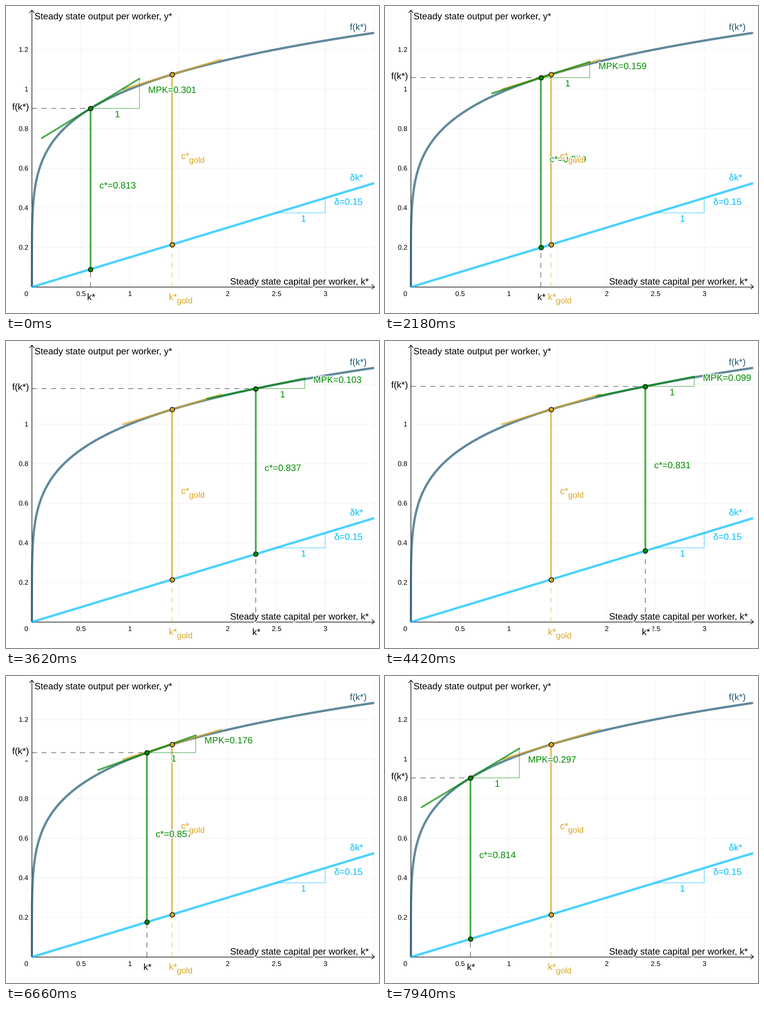
A matplotlib script for the animation above (8 s loop, 813 px wide and 669 px high).

```python
import numpy as np
import matplotlib.pyplot as plt
from matplotlib.animation import FuncAnimation
from matplotlib.patches import PathPatch, Rectangle
from matplotlib.path import Path
from matplotlib.patheffects import withStroke
from matplotlib.textpath import TextPath

W, H, DPI = 813, 669, 64
PX = 72 / DPI                      # points per pixel
X0, Y0, SX, SY = 56.45, 612.4, 213.1, 431.1
RIGHT, TOP = 803, 9
ALPHA, DELTA = 0.2, 0.15
K_MIN, K_MAX, HALF = 0.6, 2.4, 40

NAVY, SKY, GOLD, GREEN = "#1f5872", "#00bfff", "#daa520", "#008c00"

# Timing: the slider advances every 80 ms after a pause, skipping some ticks
TICK, LOOP, PAUSE, STEP = 20, 8000, 500, 80
HOLDS = np.array([1, 7, 11, 19, 25, 30, 36, 41, 48, 52, 58, 64, 70, 76, 82, 88])

plt.rcParams["font.family"] = "Liberation Sans"
fig = plt.figure(figsize=(W / DPI, H / DPI), dpi=DPI, facecolor="white")
ax = fig.add_axes([0, 0, 1, 1])
ax.set_xlim(0, W)
ax.set_ylim(H, 0)
ax.axis("off")


def px(k):
    return X0 + SX * k


def py(y):
    return Y0 - SY * y


def f(k):
    return k ** ALPHA


def mpk(k):
    return ALPHA * k ** (ALPHA - 1)


def line(xs, ys, color, width, z, alpha=0.7, snap=False, **kw):
    kw.setdefault("solid_capstyle", "butt")
    return ax.plot(xs, ys, color=color, lw=width * PX, alpha=alpha,
                   zorder=z, snap=snap, **kw)[0]


def dashed(color):
    dash = line([], [], color, 1.2, 3, dash_capstyle="butt")
    dash.set_dashes((11 / 1.2, 10 / 1.2))
    return dash


def dot(color):
    return ax.plot([], [], "o", ms=10 * PX, mfc=color, mec="black",
                   mew=1.4 * PX, zorder=7, snap=False)[0]


def text_path(s, x, y, size, anchor=0.0):
    tp = TextPath((0, 0), s, size=size)
    v = tp.vertices * [1, -1]
    if anchor:
        ends = v[:, 0]
        x -= anchor * ends.max() + (1 - anchor) * ends.min()
    return Path(v + [x, y], tp.codes)


def label(s, x, y, color="black", size=20, z=10, anchor=0.0, halo=True):
    patch = PathPatch(text_path(s, x, y, size, anchor), fc=color, ec="none",
                      lw=0, zorder=z, joinstyle="round")
    if halo:
        patch.set_path_effects([withStroke(linewidth=4 * PX, foreground="white")])
    return ax.add_patch(patch)


def box(w, h, z):
    return ax.add_patch(Rectangle((0, 0), w, h, fc="white", ec="none", zorder=z))


def draw_grid():
    for k in np.arange(0.5, 3.6, 0.5):
        line([px(k)] * 2, [TOP, Y0], "#efefef", 1, 0, 1)
        if k not in (1.5, 3.5):
            label(f"{k:g}", px(k) + 0.3, 632, size=15, z=8, anchor=0.5, halo=False)
    for y in np.arange(1, 7) / 5:
        line([X0, RIGHT], [py(y)] * 2, "#efefef", 1, 0, 1)
        label(f"{y:g}", 48, py(y) + 4.9, size=15, z=8, anchor=1.0, halo=False)
    label("0", 44, 632, size=15, z=8, anchor=0.5, halo=False)


def draw_axes():
    line([X0, RIGHT], [Y0, Y0], "black", 1.3, 1, 1, snap=True)
    line([X0, X0], [TOP, Y0], "black", 1.3, 1, 1, snap=True)
    line([RIGHT - 6, RIGHT, RIGHT - 6], [Y0 - 5.5, Y0 - 0.5, Y0 + 4.5], "black", 1.3, 1, 1)
    line([X0 - 5, X0, X0 + 5], [TOP + 6, TOP, TOP + 6], "black", 1.3, 1, 1)
    label("Steady state output per worker, y*", 62, 29)
    label("Steady state capital per worker, k*", 488.5, 607)


def draw_curves():
    y = np.linspace(0, 3.5 ** ALPHA, 400)
    line(px(y ** (1 / ALPHA)), py(y), NAVY, 5, 2)
    line([px(0), px(3.5)], [py(0), py(3.5 * DELTA)], SKY, 5, 2)
    line([px(2.5), px(3), px(3)],
         [py(2.5 * DELTA)] * 2 + [py(3 * DELTA)], SKY, 1.2, 2)
    label("f(k*)", 749.5, 52.5, NAVY)
    label("δk*", 749.5, 380.3, SKY)
    label("δ=0.15", 715.5, 433.3, SKY)
    label("1", 643, 470, SKY)


class Marker:
    """Consumption gap, tangent and points for one capital level."""

    def __init__(self, color, z):
        self.tangent = line([], [], color, 3.8, z, solid_capstyle="round")
        self.gap = line([], [], color, 4, z)
        self.drop = dashed("black" if color == GREEN else color)
        self.dots = dot(color)

    def place(self, k):
        x, top, low = px(k), py(f(k)), py(DELTA * k)
        rise = SY * mpk(k) / 2
        self.tangent.set_data([x - SX / 2, x + SX / 2], [top + rise, top - rise])
        self.gap.set_data([x, x], [top, low])
        self.drop.set_data([x, x], [Y0, low])
        self.dots.set_data([x, x], [top, low])
        return x, top, low, rise


draw_grid()
draw_axes()
draw_curves()

gold = Marker(GOLD, 4)
gold.place((DELTA / ALPHA) ** (1 / (ALPHA - 1)))
label("c*", 381.5, 333.5, GOLD, z=12)
label("gold", 399, 341.7, GOLD, 18, z=12)
label("k*", 355, 640.5, GOLD, z=12)
label("gold", 372.5, 648, GOLD, 18, z=12)

green = Marker(GREEN, 5)
level = dashed("black")
corner = line([], [], GREEN, 1.2, 5)
f_box, k_box = box(42, 36.5, 9), box(25, 30, 9)
f_lab, k_lab = label("f(k*)", 0, 0), label("k*", 0, 0)
run_lab, mpk_lab, c_lab = (label("1", 0, 0, GREEN) for _ in range(3))


def capital(t):
    n = 0
    if t >= PAUSE:
        j = (t - PAUSE) // STEP
        n = j + 1 - np.count_nonzero(HOLDS <= j)
    u = min(n, 2 * HALF - n) / HALF
    ease = 2 * u * u if u < 0.5 else 1 - 2 * (1 - u) ** 2
    return K_MIN + (K_MAX - K_MIN) * ease


def update(i):
    k = capital(i * TICK)
    x, top, low, rise = green.place(k)
    level.set_data([X0, x], [top, top])
    corner.set_data([x, x + SX / 2, x + SX / 2], [top, top, top - rise])
    f_box.set_xy((10, top - 19.7))
    k_box.set_xy((x - 9.5, 619))

    def put(patch, s, tx, ty):
        patch.set_path(text_path(s, tx, ty, 20))

    put(f_lab, "f(k*)", 13.5, top + 3.2)
    put(k_lab, "k*", x - 7.5, 640.7)
    put(run_lab, "1", x + 53, top + 19.3)
    put(mpk_lab, f"MPK={mpk(k):.3f}", x + 125.5, top - rise / 2 - 1.3)
    put(c_lab, f"c*={f(k) - DELTA * k:.3f}", x + 19.3, (top + low) / 2 - 0.8)
    return []


anim = FuncAnimation(fig, update, frames=LOOP // TICK, interval=TICK,
                     repeat=True, repeat_delay=0, blit=False)
plt.show()
```
